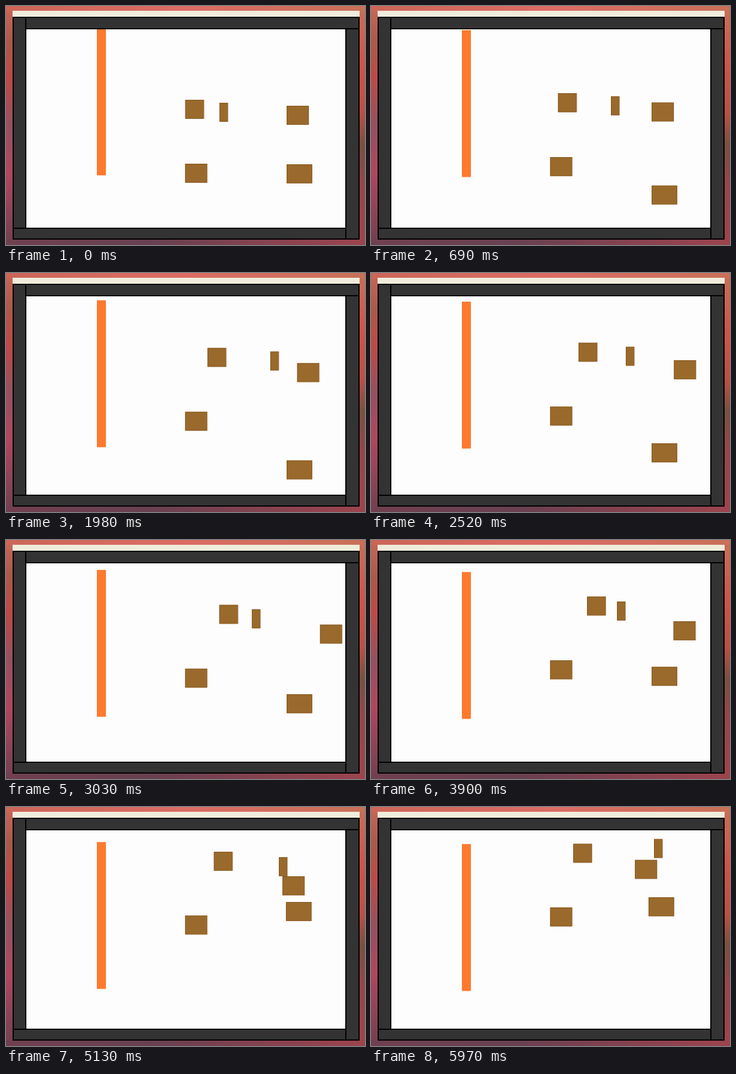
Write an HTML page that moves like this. It is 600 px wide and 400 px high and loops after 6 s.

```html
<!DOCTYPE html>
<html lang="en">
<head>
<meta charset="utf-8">
<title>Colliding blocks</title>
<style>
  html, body { margin: 0; width: 100%; height: 100%; overflow: hidden; }
  svg { display: block; width: 600px; height: 400px; }
  .wall { fill: #333; stroke: #000; stroke-width: 2; }
  .block { fill: #996a2c; stroke: #855214; stroke-width: 1; }

  /* Time advances in 30 ms ticks: 0.5% of the loop each. */
  .move { animation: 6s infinite; }
  #bar { animation-name: bar; animation-timing-function: steps(200); }
  #lift { animation-name: lift; animation-timing-function: steps(200); }
  #square { animation-name: square; }
  #slim { animation-name: slim; }
  #right { animation-name: right; }
  #wide { animation-name: wide; }

  @keyframes bar {
    from { transform: translate(152px, 37.7px); }
    to { transform: translate(152px, 62.3px); }
  }
  @keyframes lift {
    from { transform: translate(299.3px, 264px); }
    to { transform: translate(299.3px, 167.6px); }
  }
  @keyframes square {
    0% { transform: translate(299.5px, 157px); animation-timing-function: steps(117); }
    58.5% { transform: translate(365.4px, 100.8px); animation-timing-function: steps(83); }
    100% { transform: translate(337.6px, 61px); }
  }
  @keyframes slim {
    0% { transform: translate(356.7px, 162px); animation-timing-function: steps(51); }
    25.5% { transform: translate(454.9px, 137.9px); animation-timing-function: steps(66); }
    58.5% { transform: translate(396.8px, 109px); animation-timing-function: steps(54); }
    85.5% { transform: translate(456px, 84px); animation-timing-function: steps(29); }
    100% { transform: translate(473.6px, 52.4px); }
  }
  @keyframes right {
    0% { transform: translate(469px, 167px); animation-timing-function: steps(50); }
    25% { transform: translate(469px, 154.9px); animation-timing-function: steps(57); }
    53.5% { transform: translate(531.3px, 140px); animation-timing-function: steps(55); }
    81% { transform: translate(469.5px, 130.5px); animation-timing-function: steps(9); }
    85.5% { transform: translate(462px, 116px); animation-timing-function: steps(29); }
    100% { transform: translate(440.3px, 87.5px); }
  }
  @keyframes wide {
    0% { transform: translate(469px, 265px); animation-timing-function: steps(49); }
    24.5% { transform: translate(469px, 340.5px); animation-timing-function: steps(113); }
    81% { transform: translate(469px, 161.5px); animation-timing-function: steps(9); }
    85.5% { transform: translate(467.9px, 159px); animation-timing-function: steps(29); }
    100% { transform: translate(463.7px, 150.8px); }
  }
</style>
</head>
<body>
<svg viewBox="0 0 600 400">
  <defs>
    <linearGradient id="leftEdge" x2="0" y2="1">
      <stop offset="0" stop-color="#c8665a"/>
      <stop offset=".15" stop-color="#ac5a48"/>
      <stop offset=".3" stop-color="#bd4a48"/>
      <stop offset=".5" stop-color="#965060"/>
      <stop offset=".7" stop-color="#b04660"/>
      <stop offset="1" stop-color="#704050"/>
    </linearGradient>
    <linearGradient id="rightEdge" x2="0" y2="1">
      <stop offset="0" stop-color="#c87058"/>
      <stop offset=".25" stop-color="#cc5448"/>
      <stop offset=".45" stop-color="#b85046"/>
      <stop offset=".58" stop-color="#785044"/>
      <stop offset=".75" stop-color="#94464c"/>
      <stop offset="1" stop-color="#9c444e"/>
    </linearGradient>
    <linearGradient id="topEdge">
      <stop offset="0" stop-color="#cc6658"/>
      <stop offset=".5" stop-color="#dc6c64"/>
      <stop offset="1" stop-color="#c87058"/>
    </linearGradient>
    <linearGradient id="bottomEdge">
      <stop offset="0" stop-color="#704050"/>
      <stop offset=".4" stop-color="#684050"/>
      <stop offset=".75" stop-color="#884250"/>
      <stop offset="1" stop-color="#9c444e"/>
    </linearGradient>
  </defs>

  <rect width="300" height="400" fill="url(#leftEdge)"/>
  <rect x="300" width="300" height="400" fill="url(#rightEdge)"/>
  <rect width="600" height="9" fill="url(#topEdge)"/>
  <rect y="391" width="600" height="9" fill="url(#bottomEdge)"/>

  <rect x="11" y="8" width="580" height="11" fill="#f0ecdc"/>
  <rect x="33" y="38" width="535" height="334" fill="#fdfdfd"/>

  <rect id="bar" class="move" x=".5" y=".5" width="13.8" height="244.6" fill="#ff7a2e" stroke="#fb6a1c"/>
  <g class="block">
    <rect id="square" class="move" x=".5" y=".5" width="30.5" height="30.8"/>
    <rect id="slim" class="move" x=".5" y=".5" width="13.4" height="30.8"/>
    <rect id="right" class="move" x=".5" y=".5" width="36.2" height="30.8"/>
    <rect id="lift" class="move" x=".5" y=".5" width="36.2" height="30.8"/>
    <rect id="wide" class="move" x=".5" y=".5" width="41.8" height="30.8"/>
  </g>

  <g class="wall">
    <rect x="33" y="19" width="557" height="19"/>
    <rect x="12" y="19" width="21" height="353"/>
    <rect x="568" y="38" width="22" height="352"/>
    <rect x="12" y="372" width="556" height="18"/>
  </g>
</svg>
</body>
</html>
```
